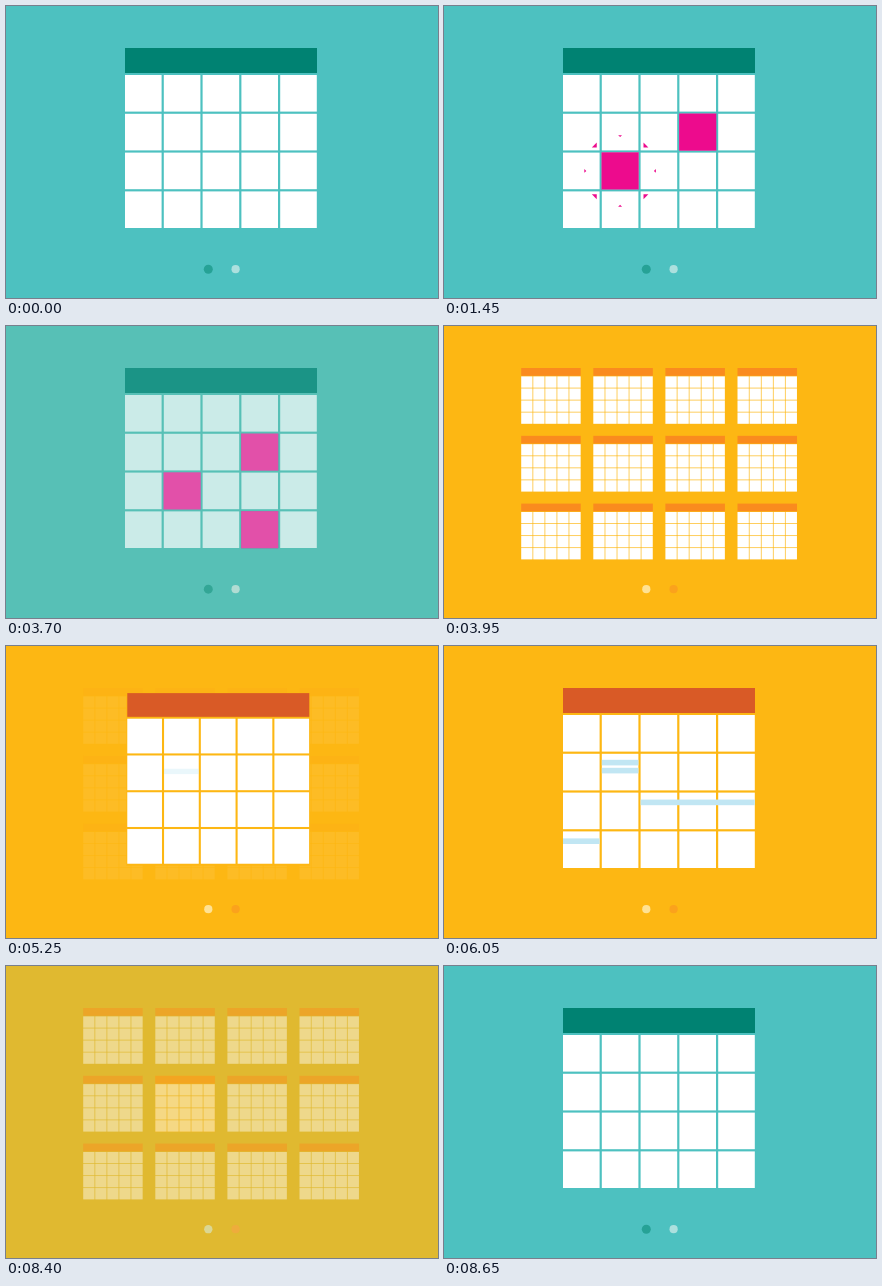
Animation, 432 px wide and 292 px high, one loop 8.7 s. Source, as an HTML page with a canvas:

```html
<!DOCTYPE html>
<html lang="en">
<head>
<meta charset="utf-8">
<title>Calendar views</title>
<style>
  html, body { margin: 0; width: 100%; height: 100%; overflow: hidden; background: #4dc1c0; }
  canvas { display: block; width: 432px; height: 292px; }
</style>
</head>
<body>
<canvas id="stage" width="432" height="292"></canvas>
<script>
const LOOP = 8700;
const ctx = document.getElementById('stage').getContext('2d');

const TEAL = [77, 193, 192], YELLOW = [253, 183, 19];
const GREEN = [0, 130, 114], ORANGE = [250, 139, 30], RUST = [217, 90, 38];
const PINK = '#ed0b8d', BLUE = '#c1e6f3';

// Calendar geometry at full size
const W = 192, H = 180, HEAD = 25, PITCH = 38.8, CELL = 36.6, TOP = 27;
const BIG = { x: 119, y: 42, s: 1 };
const ZOOM = { x: 113, y: 36.4, s: 1.0625 };
const SMALL = 0.31;
const slot = (col, row) => ({ x: 77.2 + col * 72.1, y: 42 + row * 67.8, s: SMALL });
const HOME = slot(1, 1);

const POPS = [
  { col: 3, row: 1, at: 450 },
  { col: 1, row: 2, at: 700 },
  { col: 3, row: 3, at: 1550 }
];

const BARS = [
  { col: 1, row: 1, span: 1, dy: 14, at: 5150 },
  { col: 1, row: 1, span: 1, dy: 6, at: 5450 },
  { col: 2, row: 2, span: 3, dy: 7, at: 5750 },
  { col: 0, row: 3, span: 1, dy: 7, at: 5750 }
];

const seg = (t, a, b) => Math.min(1, Math.max(0, (t - a) / (b - a)));
const lerp = (a, b, k) => a + (b - a) * k;
const easeOut = k => 1 - (1 - k) * (1 - k);
const easeInOut = k => k < 0.5 ? 2 * k * k : 1 - 2 * (1 - k) * (1 - k);
const mix = (a, b, k) => a.map((v, i) => lerp(v, b[i], k));
const rgb = c => `rgb(${c.map(Math.round).join(',')})`;
const blend = (a, b, k) => ({ x: lerp(a.x, b.x, k), y: lerp(a.y, b.y, k), s: lerp(a.s, b.s, k) });
const scaled = (p, k) => ({ x: p.x + W * p.s * (1 - k) / 2, y: p.y + H * p.s * (1 - k) / 2, s: p.s * k });
const cellX = col => col * PITCH;
const cellY = row => TOP + row * PITCH;

function calendar(place, alpha, head, extra, backing) {
  if (alpha <= 0) return;
  ctx.save();
  ctx.globalAlpha = alpha;
  ctx.translate(place.x, place.y);
  ctx.scale(place.s, place.s);
  if (backing) {
    ctx.fillStyle = backing;
    ctx.fillRect(-1, 0, W + 2, H + 2);
  }
  ctx.fillStyle = rgb(head);
  ctx.fillRect(0, 0, W, HEAD);
  ctx.fillStyle = '#fff';
  for (let row = 0; row < 4; row++)
    for (let col = 0; col < 5; col++)
      ctx.fillRect(cellX(col), cellY(row), CELL, CELL);
  if (extra) extra(alpha);
  ctx.restore();
}

// Ring of eight triangles pointing at the cell
function burst(u) {
  const r = 13 + 23 * easeOut(u), size = 1 - u * u * u;
  for (let i = 0; i < 8; i++) {
    const h = (i % 2 ? 6.4 : 3.6) * size;
    ctx.save();
    ctx.rotate(i * Math.PI / 4);
    ctx.beginPath();
    ctx.moveTo(r - h / 2, 0);
    ctx.lineTo(r + h / 2, -h);
    ctx.lineTo(r + h / 2, h);
    ctx.fill();
    ctx.restore();
  }
}

function pops(t) {
  ctx.fillStyle = PINK;
  for (const p of POPS) {
    const age = t - p.at;
    if (age <= 0) continue;
    ctx.save();
    ctx.translate(cellX(p.col) + CELL / 2, cellY(p.row) + CELL / 2);
    if (age > 250 && age < 900) burst((age - 250) / 650);
    const side = (CELL + 0.6) * easeOut(seg(age, 0, 300));
    ctx.fillRect(-side / 2, -side / 2, side, side);
    ctx.restore();
  }
}

function bars(t, alpha) {
  ctx.fillStyle = BLUE;
  for (const b of BARS) {
    ctx.globalAlpha = alpha * seg(t, b.at, b.at + 300) * (1 - seg(t, 7300, 7550));
    ctx.fillRect(cellX(b.col), cellY(b.row) + b.dy, (b.span - 1) * PITCH + CELL, 5.6);
  }
}

function dot(x, r, color) {
  ctx.fillStyle = rgb(color);
  ctx.beginPath();
  ctx.arc(x, 263.2, r, 0, Math.PI * 2);
  ctx.fill();
}

function month(t) {
  const tap = 1 - 0.08 * Math.sin(Math.PI * seg(t, 4450, 4800));
  if (t < 4950) return scaled(HOME, tap);
  if (t < 6800) return blend(HOME, BIG, easeOut(seg(t, 4950, 5365)));
  if (t < 7100) return blend(BIG, ZOOM, easeOut(seg(t, 6800, 7000)));
  return blend(ZOOM, HOME, easeOut(seg(t, 7100, 7490)));
}

function draw(t) {
  const back = t > 8000;
  const k = back ? 1 - easeInOut(seg(t, 8300, 8650)) : easeInOut(seg(t, 3650, 3950));
  ctx.globalAlpha = 1;
  ctx.fillStyle = rgb(mix(TEAL, YELLOW, k));
  ctx.fillRect(0, 0, 432, 292);

  const tealAlpha = back ? seg(t, 8480, 8650) : 1 - seg(t, 3650, 3815);
  calendar(BIG, tealAlpha, GREEN, back ? null : () => pops(t));

  const yearAlpha = back ? 1 - seg(t, 8300, 8480) : seg(t, 3780, 3950);
  if (yearAlpha > 0) {
    const open = easeOut(seg(t, 4950, 5365)) - easeOut(seg(t, 7100, 7490));
    for (let row = 0; row < 3; row++)
      for (let col = 0; col < 4; col++)
        if (row !== 1 || col !== 1)
          calendar(slot(col, row), yearAlpha * (1 - open), ORANGE);
    const tint = seg(t, 4950, 5250) - seg(t, 7100, 7550);
    calendar(month(t), yearAlpha, mix(ORANGE, RUST, tint), a => bars(t, a), rgb(YELLOW));
  }

  dot(202.3, 4.5 - 0.4 * k, mix([38, 162, 150], [255, 226, 148], k));
  dot(229.6, 4.1, mix([172, 224, 222], [251, 162, 28], k));
}

function tick() {
  draw(performance.now() % LOOP);
  requestAnimationFrame(tick);
}
tick();
</script>
</body>
</html>
```
